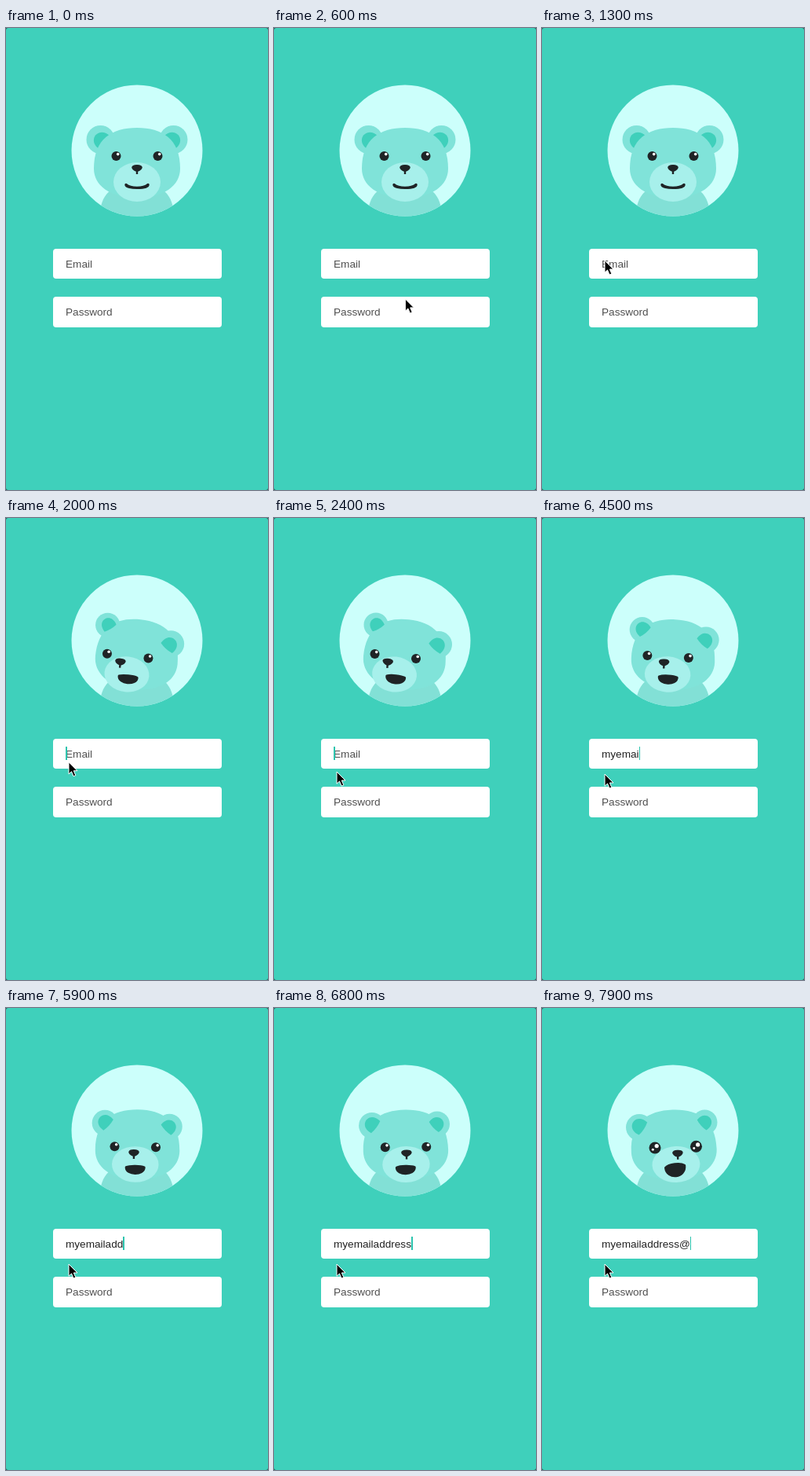
These frames come from a looping animation (334x588 px, 8 s). An HTML page with a canvas:

```html
<!DOCTYPE html>
<html lang="en">
<head>
<meta charset="utf-8">
<title>Bear login</title>
<style>
html, body { margin: 0; width: 100%; height: 100%; overflow: hidden; background: #1f5e55; }
#stage { position: relative; width: 334px; height: 588px; overflow: hidden; border-radius: 3px; background: #3fd0bb; }
canvas { position: absolute; left: 0; top: 0; width: 334px; height: 588px; }
.field {
  position: absolute; left: 59.5px; width: 198.5px; height: 38.5px; padding-left: 16.5px;
  border-radius: 4px; background: #fff; color: #505050;
  font: 13.6px/39px "Liberation Sans", Arial, sans-serif; white-space: pre;
}
.field.typed { color: #222; }
#caret { position: absolute; top: 10.5px; width: 1.6px; height: 17px; background: #2cc4ae; }
#cursor { position: absolute; left: -1px; top: -1px; }
</style>
</head>
<body>
<div id="stage">
  <canvas id="bear"></canvas>
  <div class="field" id="email" style="top:280.5px"><span id="text">Email</span><i id="caret"></i></div>
  <div class="field" style="top:342px">Password</div>
  <svg id="cursor" width="14" height="21" viewBox="-1 -1 14 21">
    <path d="M0 0V15.2L3.5 12L6 18L8.8 16.8L6.3 11H11Z" fill="#000" stroke="#fff" stroke-width="1"/>
  </svg>
</div>
<script>
const LOOP = 8000, STEP = 100, FOCUS = 1520, PAD = 16.5;
const TEXT = 'myemailaddress@';
const KEYS = [3120, 3520, 3950, 4120, 4300, 4450, 4820, 5020, 5320, 5520, 6020, 6220, 6420, 6620, 7120];
const AT = KEYS[KEYS.length - 1];
const $ = id => document.getElementById(id);

// cursor stops: time, x, y
const PATH = [[100, 195, 566], [200, 190, 470], [300, 180, 352], [400, 180, 352],
  [1300, 80, 296], [1550, 80, 296], [2400, 80, 323], [2700, 80, 326]];

// ear: x, y, radius, inner x, inner y, inner turn, inner size
const FRONT = {
  head: [167, 0, 1, 0], earL: [120.5, 142, 18, 121.5, 142.5, -53, 1], earR: [213.5, 142, 18, 212.5, 142.5, 53, 1],
  eyeL: [140.5, 163], eyeR: [193.5, 163], nose: [167, 179], muzzle: [167, 196, 30, 25], mouth: [167, 201]
};
const LEFT = {
  head: [167, 2, .955, 6], earL: [130, 136, 15.5, 130.5, 135, -30, .82], earR: [210, 161, 17, 208.8, 161.5, 42, .92],
  eyeL: [128.5, 173], eyeR: [181, 179], nose: [145, 183.8], muzzle: [153.5, 199, 28.5, 22.5], mouth: [155, 204.2]
};
const RIGHT = {
  head: [168, 2.5, .99, -2.2], earL: [124, 152, 17, 123.5, 150, -57, .92], earR: [207.5, 145.5, 16, 208, 145, 48, .84],
  eyeL: [144, 178], eyeR: [196.5, 176.3], nose: [173, 185.7], muzzle: [171, 199, 30.5, 23], mouth: [170, 205]
};
// mouth: half width, corner y, upper pull, lower pull, extra turn
const SMILE = [14, -1.5, 3.6, 3.6, 0], OPEN = [11.3, -1.8, -3.9, 8, 0], LAUGH = [12, -3, -7, 12.5, -5];

const SKIN = '#80e3d9', BODY = '#82e0d6', TEAL = '#3fd0bb', SNOUT = '#a7f0eb', DARK = '#1f2426';
const canvas = $('bear'), g = canvas.getContext('2d');
const ratio = window.devicePixelRatio || 1;
canvas.width = 334 * ratio;
canvas.height = 588 * ratio;
g.font = '13.6px "Liberation Sans", Arial, sans-serif';
const widths = Array.from({ length: TEXT.length + 1 }, (_, n) => g.measureText(TEXT.slice(0, n)).width);
const fullWidth = widths[TEXT.length];

const mix = (a, b, k) => a + (b - a) * k;
const mixAll = (a, b, k) => a.map((v, i) => mix(v, b[i], k));
const mixPose = (a, b, k) => Object.fromEntries(Object.keys(a).map(n => [n, mixAll(a[n], b[n], k)]));
const rad = deg => deg * Math.PI / 180;
const expoOut = ms => ms <= 0 ? 0 : ms >= 1000 ? 1 : 1 - 2 ** (-ms / 100);
const smooth = k => k * k * (3 - 2 * k);

// each key press starts a new tween from wherever the last one got to
function gaze(t) {
  let u = 0;
  KEYS.forEach((start, i) => {
    if (t < start) return;
    const end = Math.min(t, KEYS[i + 1] || LOOP);
    u = mix(u, widths[i + 1] / fullWidth, expoOut(end - start));
  });
  return u;
}

function cursorAt(t) {
  for (let i = 1; i < PATH.length; i++) {
    const [t0, ...from] = PATH[i - 1], [t1, ...to] = PATH[i];
    if (t <= t1) return mixAll(from, to, smooth(Math.max(0, (t - t0) / (t1 - t0))));
  }
  return PATH[PATH.length - 1].slice(1);
}

function oval(x, y, rx, ry, color, turn = 0) {
  g.fillStyle = color;
  g.beginPath();
  g.ellipse(x, y, rx, ry, rad(turn), 0, 7);
  g.fill();
}

function shape(x, y, turn, color, d, sx = 1, sy = sx, line = 0) {
  g.save();
  g.translate(x, y);
  g.rotate(rad(turn));
  g.scale(sx, sy);
  const p = new Path2D(d);
  g.fillStyle = g.strokeStyle = color;
  g.fill(p);
  if (line) {
    g.lineWidth = line;
    g.lineJoin = g.lineCap = 'round';
    g.stroke(p);
  }
  g.restore();
}

const innerEar = ([, , , x, y, turn, size]) =>
  shape(x, y, turn, TEAL, 'M-10.5 7C-14 -15 14 -15 10.5 7Q0 9.5 -10.5 7Z', size);

function eye([x, y], joy) {
  const r = mix(6, 7.5, joy);
  oval(x, y, r, r, DARK);
  oval(x + 2.2, y - 2.4, mix(1.8, 2.6, joy), mix(1.8, 2.6, joy), '#fff');
  if (joy > .05) oval(x - 2.7, y + 2.2, 1.5 * joy, 1.5 * joy, '#fff');
}

function drawBear(focus, u, joy) {
  const p = mixPose(FRONT, mixPose(LEFT, RIGHT, u), focus);
  const [hx, hy, hs, turn] = p.head;
  g.setTransform(ratio, 0, 0, ratio, 0, 0);
  g.clearRect(0, 0, 334, 588);
  g.save();
  oval(167, 156, 83.5, 83.5, '#ccfffb');
  g.clip();

  shape(167, 0, 0, BODY, 'M-48 246C-48 214 -36 198 0 198C36 198 47.5 214 47.5 246Z');
  for (const ear of [p.earL, p.earR]) oval(ear[0], ear[1], ear[2], ear[2], SKIN);
  if (focus < .5) [p.earL, p.earR].forEach(innerEar);
  shape(hx, 172 + hy, turn, SKIN,
    'M-55 7C-55 -31 -32 -45 0 -45C32 -45 55 -31 55 7C55 28 35 44 0 44C-35 44 -55 28 -55 7Z', hs, 1);
  if (focus >= .5) [p.earL, p.earR].forEach(innerEar);

  const [mx, my, rx, ry] = p.muzzle;
  oval(mx, my, rx, ry, SNOUT, turn);
  eye(p.eyeL, joy);
  eye(p.eyeR, joy);
  shape(p.nose[0], p.nose[1], turn, DARK,
    'M-6.8 -1.5Q-6.5 -5 0 -5Q6.5 -5 6.8 -1.5Q6 2 1.2 3.8V7H-1.2V3.8Q-6 2 -6.8 -1.5Z');

  const [w, end, top, low, tilt] = mixAll(mixAll(SMILE, OPEN, focus), LAUGH, joy);
  shape(p.mouth[0], p.mouth[1], turn + tilt, DARK,
    `M${-w} ${end}C${-w * .6} ${top} ${w * .6} ${top} ${w} ${end}C${w} ${low} ${-w} ${low} ${-w} ${end}Z`, 1, 1, 3.4);
  g.restore();
}

function render(t) {
  const typed = KEYS.filter(k => t >= k).length;
  drawBear(expoOut(t - FOCUS), gaze(t), expoOut(t - AT));

  $('text').textContent = typed ? TEXT.slice(0, typed) : 'Email';
  $('email').classList.toggle('typed', typed > 0);
  $('caret').style.left = PAD + widths[typed] + 'px';
  $('caret').style.opacity = t < FOCUS ? 0 : t < 2900 || typed ? 1 : t < 3000 ? .5 : 0;

  const [x, y] = cursorAt(t);
  $('cursor').style.transform = `translate(${x}px, ${y}px)`;
  $('cursor').style.visibility = t < 100 ? 'hidden' : 'visible';
}

const begin = performance.now();
function tick() {
  const t = (performance.now() - begin) % LOOP;
  render(Math.floor(t / STEP) * STEP);
  requestAnimationFrame(tick);
}
tick();
</script>
</body>
</html>
```
